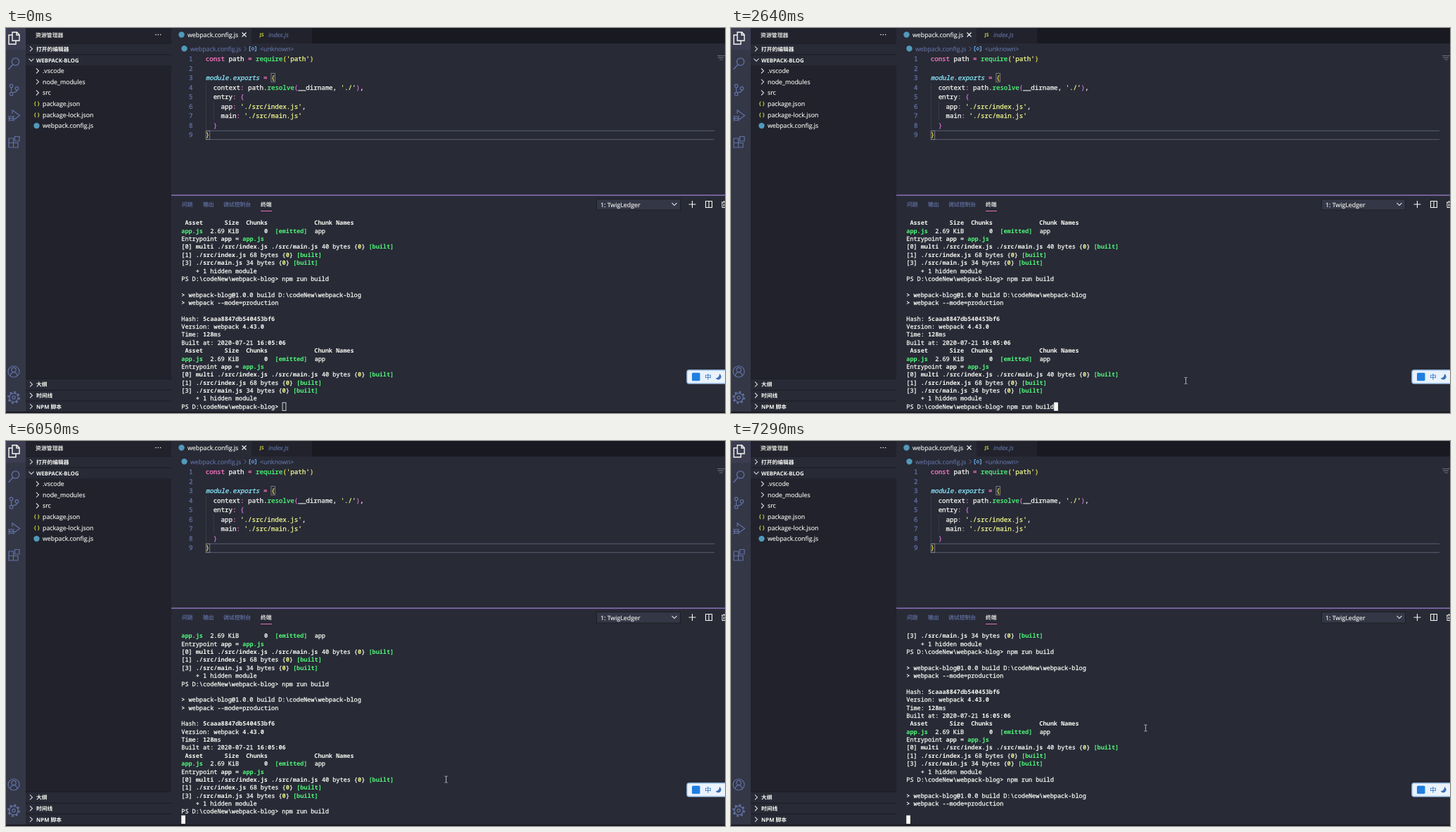
Animation, 1022 px wide and 548 px high, one loop 8000 ms. Source, as an HTML page:

```html
<!DOCTYPE html>
<html lang="zh-CN">
<head>
<meta charset="utf-8">
<title>Terminal build</title>
<style>
  html, body { margin: 0; width: 100%; height: 100%; overflow: hidden; background: #282a36; }
  svg { display: block; width: 100vw; height: 100vh; }
  text { white-space: pre; text-rendering: geometricPrecision; }
  .mono { font-family: "Noto Sans Mono", "DejaVu Sans Mono", monospace; stroke-width: 0.28px; }
  .ui { font-family: "Open Sans", "Noto Sans CJK SC", "Noto Sans CJK", sans-serif; stroke-width: 0.15px; }
</style>
</head>
<body>
<svg id="stage" viewBox="0 0 1022 548" preserveAspectRatio="none"></svg>
<script>
const LOOP = 8000;
const FG = '#f8f8f2', DIM = '#6272a4', EDGE = '#191a21', BG = '#282a36', SIDE = '#21222c', BLUE = '#519aba';
const stage = document.getElementById('stage');

function add(tag, attrs, parent = stage, content) {
  const el = document.createElementNS('http://www.w3.org/2000/svg', tag);
  for (const k in attrs) el.setAttribute(k, attrs[k]);
  if (content !== undefined) el.textContent = content;
  return parent.appendChild(el);
}
const rect = (x, y, width, height, fill, more, parent) => add('rect', { x, y, width, height, fill, ...more }, parent);
const dot = (cx, cy, r, fill, more, parent) => add('circle', { cx, cy, r, fill, ...more }, parent);
const line = (d, stroke, width = 1, parent) =>
  add('path', { d, stroke, fill: 'none', 'stroke-width': width }, parent);
const label = (x, y, s, fill = FG, size = 8.8, more, parent) =>
  add('text', { x, y, fill, stroke: fill, 'font-size': size, class: 'ui', ...more }, parent, s);
const right = (x, y) => line(`M${x - 2} ${y - 3.5}l3.5 3.5l-3.5 3.5`, '#d5d6dc', 1.1);
const down = (x, y) => line(`M${x - 3.5} ${y - 2}l3.5 3.5l3.5 -3.5`, '#d5d6dc', 1.1);

// "|k" in a line of text switches to style k
const plain = fill => ({ fill, stroke: fill });
const bold = fill => ({ fill, 'font-weight': 700 });
const STYLES = {
  w: plain(FG),
  W: bold(FG),
  G: bold('#50fa7b'),
  Y: bold('#f1fa8c'),
  p: plain('#ff79c6'),
  g: plain('#50fa7b'),
  c: { ...plain('#8be9fd'), 'font-style': 'italic' },
  s: plain('#f1fa8c'),
  o: plain('#f0e04a'),
  v: plain('#da70d6')
};
function rich(src, x, y, size, parent) {
  const adv = size * 0.6, parts = ('|w' + src).split(/\|(.)/).slice(1);
  for (let i = 0, col = 0; i < parts.length; i += 2) {
    const s = parts[i + 1];
    if (s.trim()) add('text', { x: x + col * adv, y, 'font-size': size, class: 'mono', ...STYLES[parts[i]] }, parent, s);
    col += s.length;
  }
}

function drawActivityBar() {
  rect(0, 0, 28, 546, '#343746');
  rect(0, 0, 28, 31, '#bd93f9', { opacity: 0.06 });
  line('M9 6h6.5l3.5 3.5v8.5h-10zM15 6v4h4M9 10h-5v13h10v-5', FG, 1.4);
  const icon = (d, w = 1.2) => line(d, DIM, w);
  const ring = (x, y, r, w = 1.2, more) => dot(x, y, r, 'none', { stroke: DIM, 'stroke-width': w, ...more });
  ring(13.5, 48, 5.2, 1.3);
  icon('M9.7 52l-6.2 7', 1.4);
  for (const [x, y] of [[7.5, 82.5], [7.5, 94], [15.5, 86]]) ring(x, y, 2.3);
  icon('M7.5 85v6.7M15.5 88.5q0 3 -5 3.2l-1.5 .5');
  icon('M9 122v-5l10.5 7.5l-8 6');
  ring(7.5, 128.5, 3);
  icon('M3 125l2 1.5M12 125l-2 1.5M2.5 129h2M10.5 129h2M3 133l2 -2M12 133l-2 -2M5 128.5h5', 1);
  icon('M4 157h6.5v13h-6.5zM4 163.5h13v6.5h-7M12.5 154.5h6.5v6.5h-6.5z');
  ring(11, 489, 8);
  ring(11, 486.5, 3.2);
  icon('M6 495q1 -5 5 -5t5 5');
  ring(11, 526, 6.2, 1.3);
  ring(11, 526, 7.8, 2.2, { 'stroke-dasharray': '3 3.126' });
  ring(11, 526, 2.2);
}

function drawSidebar() {
  rect(28, 0, 207, 546, SIDE);
  label(42, 12.5, '资源管理器', FG, 7.9);
  for (const x of [213, 216.3, 219.6]) dot(x, 9.5, 0.8, FG);
  const heavy = { 'font-weight': 700, stroke: 'none' };
  const section = (y, s, open) => {
    rect(28, y - 7.8, 207, 15.6, BG);
    rect(28, y - 8, 207, 0.8, EDGE);
    (open ? down : right)(36, y);
    label(43, y + 3.1, s, FG, 7.76, heavy);
  };
  section(29.7, '打开的编辑器');
  section(45.6, 'WEBPACK-BLOG', true);
  section(507.2, '大纲');
  section(523, '时间线');
  section(538.6, 'NPM 脚本');
  ['.vscode', 'node_modules', 'src', 'package.json', 'package-lock.json', 'webpack.config.js'].forEach((s, i) => {
    const y = 61 + i * 15.62;
    label(52, y + 3.1, s);
    if (i < 3) right(45, y);
    else if (i < 5) label(39.8, y + 2.3, '{ }', '#cbcb41', 7.6, heavy);
    else dot(43.5, y, 4.2, BLUE);
  });
}

const CODE = [
  "|pconst |wpath |p= |grequire|o(|s'path'|o)",
  '',
  '|cmodule.exports |p= |o{',
  "  context|p: |wpath.|gresolve|v(|w__dirname, |s'./'|v)|w,",
  '  entry|p: |v{',
  "    app|p: |s'./src/index.js'|w,",
  "    main|p: |s'./src/main.js'",
  '  |v}',
  '|o}'
];

function drawEditor() {
  rect(235, 0, 787, 22, EDGE);
  rect(235, 0, 114, 22, BG);
  rect(349, 0, 86, 22, SIDE);
  dot(249.5, 9.5, 4.2, BLUE);
  label(258, 13, 'webpack.config.js');
  line('M335.5 6.5l6 6M341.5 6.5l-6 6', FG, 1.1);
  label(360.5, 12, 'JS', '#cbcb41', 6.8, { 'font-weight': 700, stroke: 'none' });
  label(373, 13, 'index.js', DIM, 8.7, { 'font-style': 'italic' });

  dot(253.5, 29.3, 4.2, BLUE);
  label(262, 32.8, 'webpack.config.js', DIM);
  line('M338.5 26.5l3 3l-3 3', DIM, 0.9);
  line('M348 26.5h-1.8v6.3h1.8M353.5 26.5h1.8v6.3h-1.8', '#75beff', 1);
  dot(350.8, 29.6, 1.7, 'none', { stroke: '#75beff', 'stroke-width': 1 });
  label(361, 32.8, '<unknown>', DIM);

  line('M284 146.3H1007M284 158.7H1007', '#5b5e73', 1);
  line('M284.4 77.5V145M295.3 104.5V131', '#41434f', 0.8);
  for (const [x, y] of [[376.9, 64.5], [284.2, 146.3]])
    rect(x, y, 5.5, 12.4, 'none', { stroke: '#8a8b8f', 'stroke-width': 0.8 });
  CODE.forEach((src, i) => {
    const y = 47 + i * 13.5;
    add('text', { x: 265.5, y, ...plain(DIM), 'font-size': 9.14, class: 'mono', 'text-anchor': 'end' }, stage, i + 1);
    rich(src, 283.7, y, 9.14, stage);
  });
  line('M1011 39.5h11M1012 42.2h8M1014 45h5', '#696c7a', 1.2);
}

function drawPanelBar() {
  rect(235, 237.5, 787, 1, '#bd93f9');
  const tabs = { 250: '问题', 280: '输出', 309: '调试控制台', 362: '终端' };
  for (const x in tabs) label(x, 254.3, tabs[x], x > 350 ? FG : DIM, 7.85);
  rect(362, 260, 16, 0.9, '#ff79c6');
  rect(839.5, 243.5, 119, 15.5, '#343746', { stroke: EDGE, 'stroke-width': 0.8 });
  label(845, 255, '1: TwigLedger');
  down(950, 251);
  line('M975.5 246v10M970.5 251h10', FG, 1.1);
  line('M994.5 246.5h9v9h-9zM999 246.5v9', FG, 1.1);
  line('M1017 248h5M1018 248v7.5h4M1020.5 246v2M1020.5 250v4', FG, 1);
}

const X0 = 249.3, Y0 = 280.3, ROW = 11.37, CELL = 8.53;
const PROMPT = 'PS D:\\codeNew\\webpack-blog> ';
const STATS = [
  '|W Asset      Size  Chunks             Chunk Names',
  '|Gapp.js|w  2.69 KiB       |W0  |G[emitted]|w  app',
  'Entrypoint |Wapp|w = |Gapp.js',
  '[0] |Wmulti ./src/index.js ./src/main.js|w 40 bytes {|Y0|w} |G[built]',
  '[1] |W./src/index.js|w 68 bytes {|Y0|w} |G[built]',
  '[3] |W./src/main.js|w 34 bytes {|Y0|w} |G[built]',
  '    + 1 hidden module'
];
const RUN = ['', '> webpack-blog@1.0.0 build D:\\codeNew\\webpack-blog', '> webpack --mode=production', ''];
const LINES = [
  ...STATS, PROMPT + 'npm run build', ...RUN,
  'Hash: |W5caaa8847db540453bf6', 'Version: webpack |W4.43.0', 'Time: |W128|wms',
  'Built at: 2020-07-21 |W16:05:06',
  ...STATS, PROMPT, ...RUN
];

drawActivityBar();
drawSidebar();
drawEditor();
drawPanelBar();

const clip = add('clipPath', { id: 'view' });
rect(236, 272, 786, 273.5, '#000', {}, clip);
const screen = add('g', { 'clip-path': 'url(#view)' });
const scroll = add('g', {}, screen);
LINES.forEach((s, i) => rich(s, X0, Y0 + i * ROW, CELL, scroll));
const typed = add('g', {}, scroll);
rich(' '.repeat(PROMPT.length) + 'npm run build', X0, Y0 + 23 * ROW, CELL, typed);
const block = rect(0, 533.2, 4.9, 11.2, FG, { stroke: FG, 'stroke-width': 0.8 });

rect(0, 546, 1022, 2, EDGE);

const ime = add('g', {});
rect(968, 487, 60, 19, '#eaf2fb', { rx: 3, stroke: '#9fc3ea', 'stroke-width': 1.4 }, ime);
rect(975, 490.8, 11.5, 11.5, '#1f7fe0', { rx: 1.5 }, ime);
label(993.2, 500.2, '中', '#2a6fc4', 9.4, {}, ime);
add('path', { d: 'M1014 492.3a4.3 4.3 0 1 1 -5.3 6.3a6 6 0 0 0 5.3 -6.3z', fill: '#3d6fb5' }, ime);

const mouse = add('g', {});
const halo = dot(0, 0, 8.7, '#948f14', {}, mouse);
const beam = line('M-2 -4.5h1.3l.7 .6l.7 -.6h1.3M0 -4v8M-2 4.5h1.3l.7 -.6l.7 .6h1.3', '#c9cad0', 0.9, mouse);

// start, end, steps, from x, y, to x, y
const MOVES = [
  [150, 620, 7, 706, 572, 649.5, 501.5],
  [940, 940, 1, 649.5, 501.5, 648, 502],
  [1000, 1000, 1, 648, 502, 647, 502],
  [1230, 1230, 1, 647, 502, 646.5, 502],
  [5440, 5440, 1, 646.5, 502, 644.3, 516],
  [5510, 5510, 1, 644.3, 516, 649, 514],
  [5590, 5590, 1, 649, 514, 646, 509.5],
  [5900, 6510, 9, 646, 509.5, 584.8, 426],
  [6920, 7290, 6, 584.8, 426, 589.3, 408.5]
];
function mouseAt(t) {
  let x = 706, y = 572;
  for (const [a, b, n, x0, y0, x1, y1] of MOVES) {
    if (t < a) break;
    const k = b > a ? Math.min(1, (Math.floor((t - a) / (b - a) * (n - 1) + 0.05) + 1) / n) : 1;
    x = x0 + (x1 - x0) * k;
    y = y0 + (y1 - y0) * k;
  }
  return [x, y];
}

const show = (el, on) => el.setAttribute('visibility', on ? 'visible' : 'hidden');

function render(t) {
  const rows = t < 4030 ? 0 : t < 7210 ? 1 : 5;
  const col = t < 2640 ? 28 : t < 4030 ? 41 : 0;
  const clicked = t >= 620 && t < 860;
  scroll.setAttribute('transform', `translate(0 ${-rows * ROW})`);
  show(typed, t >= 2640);
  block.setAttribute('x', X0 + 0.4 + col * CELL * 0.6);
  block.setAttribute('fill', t < 860 ? 'none' : FG);
  show(ime, !clicked);
  show(halo, clicked);
  beam.setAttribute('stroke', clicked ? '#e4e08a' : '#c9cad0');
  mouse.setAttribute('transform', `translate(${mouseAt(t).join(' ')})`);
}

const begin = performance.now();
function tick() {
  render((performance.now() - begin) % LOOP);
  requestAnimationFrame(tick);
}
tick();
</script>
</body>
</html>
```
